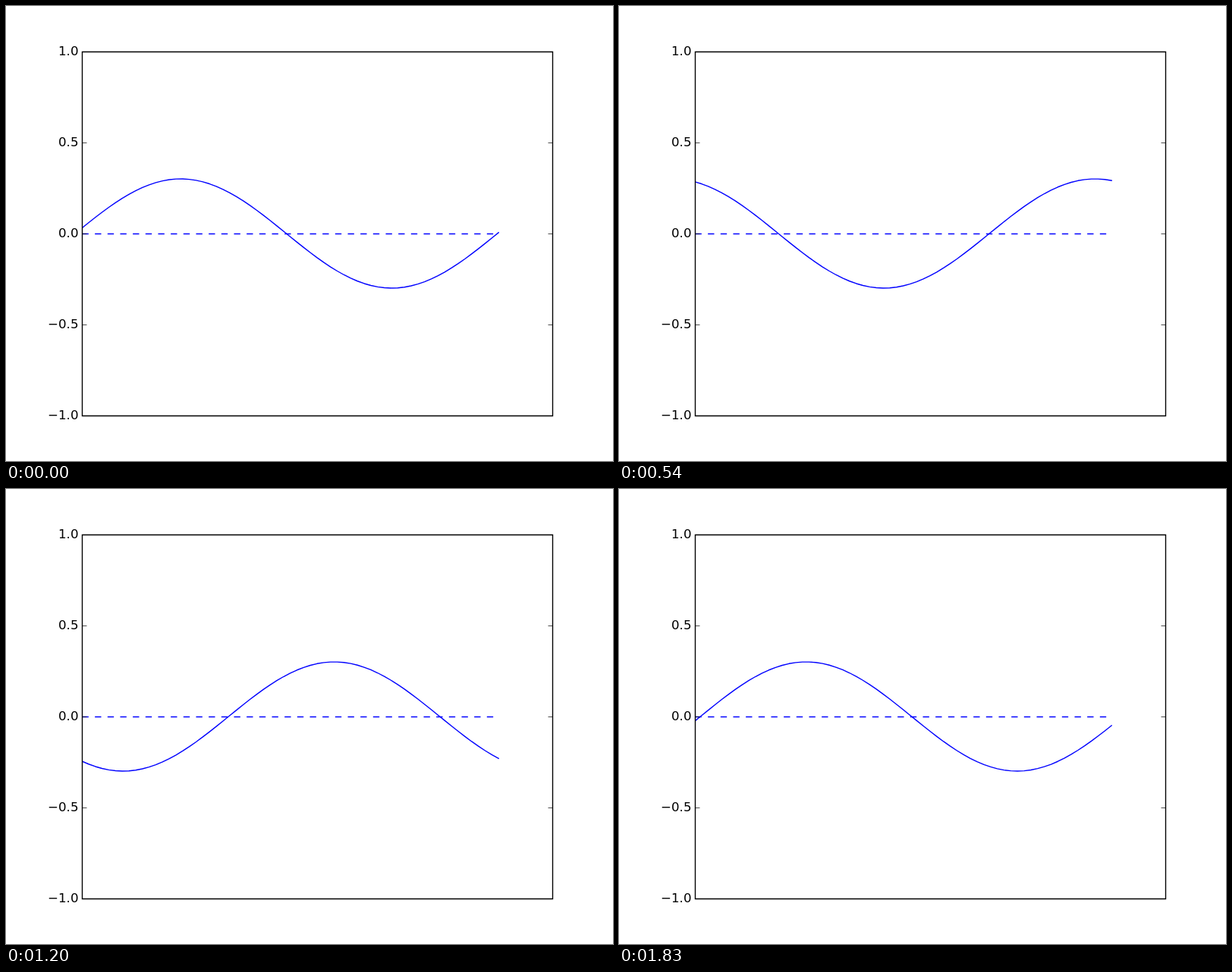
Recreate the animation shown at these times as an HTML page. Size 800x600 px, loop 1.86 s.

```html
<!DOCTYPE html>
<html lang="en">
<head>
<meta charset="utf-8">
<title>Travelling sine wave</title>
<style>
  html, body { margin: 0; width: 100%; height: 100%; overflow: hidden; background: #fff; }
  svg { display: block; }
  text { font: 16.667px "DejaVu Sans", Verdana, sans-serif; text-anchor: end; }
  path { fill: none; stroke-width: 1.389; }
  .blue { stroke: #00f; }
  .frame { stroke: #000; }
  .tick { stroke: #000; stroke-width: 0.694; }
</style>
</head>
<body>
<svg width="800" height="600" viewBox="0 0 800 600">
  <clipPath id="plot"><rect x="100" y="60" width="620" height="480"/></clipPath>
  <g clip-path="url(#plot)">
    <path id="wave" class="blue" stroke-linecap="square" stroke-linejoin="round"/>
    <path class="blue" d="M100.5 300.5H649.5" stroke-dasharray="8.333"/>
  </g>
  <g id="axis"></g>
  <path class="frame" d="M100.5 60.5H720.5V540.5H100.5Z"/>
</svg>
<script>
  const STEP_MS = 30, STEPS = 62;
  const DX = 0.1, POINTS = 63, AMPLITUDE = 0.3;
  const px = x => 100 + x * 620 / 7;
  const py = y => 300 - y * 240;

  const label = v => (v < 0 ? "\u2212" : "") + Math.abs(v).toFixed(1);
  document.getElementById("axis").innerHTML = [1, 0.5, 0, -0.5, -1].map(v => {
    const y = py(v);
    return `<path class="tick" d="M100.5 ${y + 0.5}h6M720.5 ${y + 0.5}h-6"/>` +
      `<text x="95.5" y="${y + 5}">${label(v)}</text>`;
  }).join("");

  const wave = document.getElementById("wave");
  const start = performance.now();
  let shown = -1;

  function draw(step) {
    const phase = (step + 1) * DX;
    const points = Array.from({ length: POINTS }, (_, i) => {
      const x = i * DX;
      return px(x).toFixed(3) + " " + py(AMPLITUDE * Math.sin(x + phase)).toFixed(3);
    });
    wave.setAttribute("d", "M" + points.join("L"));
  }

  function tick() {
    const step = Math.floor((performance.now() - start) / STEP_MS) % STEPS;
    if (step !== shown) draw(shown = step);
    requestAnimationFrame(tick);
  }
  tick();
</script>
</body>
</html>
```
